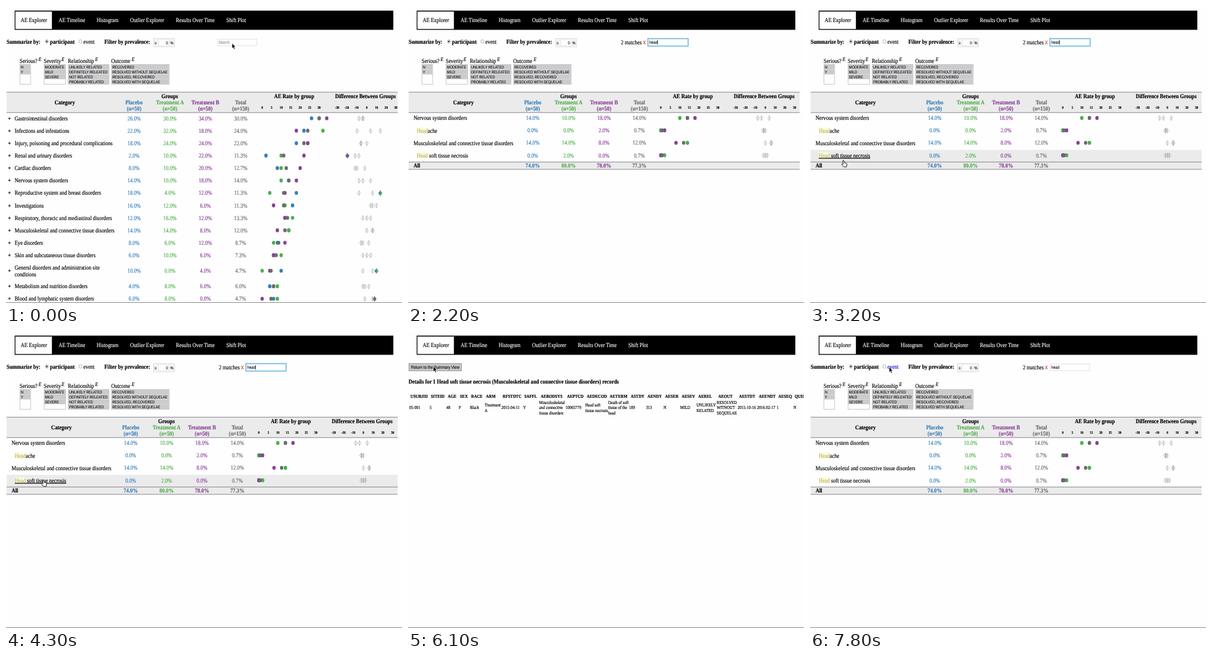
These frames come from a looping animation (640 px wide and 480 px high, 8 s). An HTML page:

```html
<!DOCTYPE html>
<html lang="en">
<head>
<meta charset="utf-8">
<title>AE Explorer</title>
<style>
  html, body { margin: 0; width: 100%; height: 100%; overflow: hidden; background: #fefefe; }
  svg { display: block; width: 640px; height: 480px; }
  text { font: 9.77px "Liberation Serif", Times, serif; text-rendering: geometricPrecision; white-space: pre; }
  text, tspan { fill: currentColor; stroke: currentColor; stroke-width: 0.18px; }
  .b { font-weight: bold; }
  .i { font-style: italic; font-size: 8.5px; }
  .m { text-anchor: middle; }
  .ui { font: 6.75px "Liberation Sans", Arial, sans-serif; stroke-width: 0.08px; }
  .opt { font-size: 6.5px; }
  .btn { font-size: 7.15px; }
  .x { font-size: 8.6px; }
  .tick { font-size: 6px; font-weight: bold; }
  .th { font-size: 7.6px; font-weight: bold; }
  .td { font-size: 7.4px; }
  .bg { fill: none; }
  .hover .bg { fill: #ebebeb; }
  .hover .cat { text-decoration: underline; }
</style>
</head>
<body>
<svg id="stage" viewBox="0 0 640 480"></svg>
<script>
const LOOP = 8000, STEP = 100;
const SQUEEZE = 0.857;
const BLUE = '#377eb8', GREEN = '#4daf4a', PURPLE = '#8a3f98', GRAY = '#6b6b6b';
const COLORS = [BLUE, GREEN, PURPLE, GRAY];
const PAGE = '#fefefe', BAND = '#ebebeb', PICKED = '#cbcbcd', LINE = '#6c6c78';

const text = (x, y, s, cls = '', color = '#000') =>
  `<text class="${cls}" color="${color}" transform="translate(${x} ${y}) scale(${SQUEEZE} 1)">${s}</text>`;
const rect = (x, y, w, h, fill, stroke = 'none', sw = 0.7) =>
  `<rect x="${x}" y="${y}" width="${w}" height="${h}" fill="${fill}" stroke="${stroke}" stroke-width="${sw}"/>`;
const rule = y => rect(1, y, 632, 0.8, LINE);
const group = (id, body, cls = '') => `<g id="${id}" class="${cls}">${body}</g>`;

function nav() {
  const tabs = [['AE Timeline', 85], ['Histogram', 146.5], ['Outlier Explorer', 200.5],
    ['Results Over Time', 274.5], ['Shift Plot', 356]];
  return rect(14, 7.5, 612, 31, '#000') + rect(15.2, 9, 59, 28.2, PAGE) +
    text(23.7, 26, 'AE Explorer') + tabs.map(([s, x]) => text(x, 26, s, '', '#fff')).join('');
}

const radio = (x, on) =>
  `<ellipse cx="${x}" cy="57.3" rx="2.6" ry="3" fill="#f6f6f6" stroke="#a0a0a0" stroke-width=".7"/>` +
  (on ? `<ellipse cx="${x}" cy="57.3" rx="1.3" ry="1.5" fill="#333"/>` : '');

function select(x, w, label, markX, options) {
  return text(x, 92, label) + text(markX, 88.8, 'E', 'i') +
    rect(x + 0.4, 94.4, w, 32.2, PAGE, '#b4b4b4') +
    options.map((s, i) => rect(x + 0.8, 95 + i * 7.8, w - 0.8, 7.8, PICKED) +
      text(x + 2, 101.3 + i * 7.8, s, 'ui opt')).join('');
}

function controls() {
  return text(1, 60.7, 'Summarize by:', 'b') + radio(66, true) + text(71, 60.7, 'participant', 'b') +
    radio(120.3, false) + group('event', text(125, 60.7, 'event')) +
    text(159, 60.7, 'Filter by prevalence:', 'b') +
    rect(238.5, 52.5, 34, 13.5, '#f4f4f4', '#d4d4d0') + rect(246.5, 54, 17, 10.5, PAGE, '#d8d8d4', 0.5) +
    text(240.3, 61.5, '≥', 'ui') + text(258.5, 61.7, '0', 'ui') + text(265.5, 61.5, '%', 'ui') +
    select(22, 17.5, 'Serious?', 52.5, ['N', 'Y']) +
    select(61, 35, 'Severity', 89.7, ['MODERATE', 'MILD', 'SEVERE']) +
    select(100, 66, 'Relationship', 144, ['UNLIKELY RELATED', 'DEFINITELY RELEATED', 'NOT RELATED', 'PROBABLY RELATED']) +
    select(170, 93.5, 'Outcome', 203, ['RECOVERED', 'RESOLVED WITHOUT SEQUELAE', 'RESOLVED, RECOVERED', 'RESOLVED WITH SEQUELAE']);
}

// Column centres; dx shifts the whole table when the toggle column is gone.
const COLS = [207, 265, 322.2, 379.3];
const rateX = v => 414 + v * 3.07;
const diffX = v => 583 + v * 1.57;

function head(dx) {
  const names = ['Placebo', 'Treatment A', 'Treatment B', 'Total'];
  let s = rect(1, 139, 632, 33, BAND) + rule(138.8) + rule(171.8) +
    text(95 + dx, 158.7, 'Category', 'b m') + text(264.7 + dx, 148.6, 'Groups', 'b m') +
    text(465.7 + dx, 148.6, 'AE Rate by group', 'b m') +
    text(581 + dx, 148.6, 'Difference Between Groups', 'b m');
  names.forEach((n, i) => {
    s += text(COLS[i] + dx, 158.7, n, 'b m', COLORS[i]) +
      text(COLS[i] + dx, 169, i < 3 ? '(n=50)' : '(n=150)', 'b m', COLORS[i]);
  });
  for (let v = 0; v <= 30; v += 5) s += text(rateX(v) + dx, 166, v, 'tick m');
  for (let v = -30; v <= 30; v += 10) s += text(diffX(v) + dx - (v < 0 ? 0.8 : 0), 166, v, 'tick m');
  return s;
}

function diamond(x, y, left, right, strong) {
  const half = (w, c) => `<path d="M${x} ${y - 4}l${w} 4l${-w} 4z" fill="${c}" fill-opacity="${strong ? 1 : 0.07}" ` +
    `stroke="${strong ? c : '#8c8c8c'}" stroke-width=".6" stroke-opacity="${strong ? 1 : 0.5}"/>`;
  return half(-3, left) + half(3, right);
}

const PAIRS = [[0, 1], [0, 2], [1, 2]];

function values(y, all, dx, cls) {
  return all.map((v, i) => text(COLS[i] + dx, y + 3, v.toFixed(1) + '%', cls, COLORS[i])).join('');
}

function row(y, rates, dx, strong = -1) {
  const all = [...rates, (rates[0] + rates[1] + rates[2]) / 3];
  const dots = all.map((v, i) =>
    `<ellipse cx="${rateX(v) + dx}" cy="${y - 0.3}" rx="2.7" ry="3.2" fill="${COLORS[i]}"/>`).join('');
  const diffs = PAIRS.map(([a, b], i) =>
    diamond(diffX(rates[a] - rates[b]) + dx, y, COLORS[a], COLORS[b], i === strong)).join('');
  return values(y, all, dx, 'm') + dots + diffs;
}

const ROWS = [
  ['Gastrointestinal disorders', 26, 30, 34],
  ['Infections and infestations', 22, 32, 18],
  ['Injury, poisoning and procedural complications', 18, 24, 24],
  ['Renal and urinary disorders', 2, 10, 22, 1],
  ['Cardiac disorders', 8, 10, 20],
  ['Nervous system disorders', 14, 10, 18],
  ['Reproductive system and breast disorders', 18, 4, 12, 0],
  ['Investigations', 16, 12, 6],
  ['Respiratory, thoracic and mediastinal disorders', 12, 16, 12],
  ['Musculoskeletal and connective tissue disorders', 14, 14, 8],
  ['Eye disorders', 8, 6, 12],
  ['Skin and subcutaneous tissue disorders', 6, 10, 6],
  ['General disorders and administration site|conditions', 10, 0, 4, 0],
  ['Metabolism and nutrition disorders', 4, 8, 6],
  ['Blood and lymphatic system disorders', 6, 8, 0, 2]
];

function fullTable() {
  let y = 181.7, s = head(0);
  for (const [name, a, b, c, strong] of ROWS) {
    const lines = name.split('|'), extra = (lines.length - 1) * 5;
    y += extra;
    s += text(3.3, y + 3, '+', 'b') + row(y, [a, b, c], 0, strong);
    lines.forEach((l, i) => { s += text(14, y + 3 - extra + i * 10.7, l); });
    y += 20.12 + extra;
  }
  return s;
}

const FOUND = [
  ['Nervous system disorders', 14, 10, 18],
  ['Head|ache', 0, 0, 2],
  ['Musculoskeletal and connective tissue disorders', 14, 14, 8],
  ['Head| soft tissue necrosis', 0, 2, 0]
];

function foundTable() {
  const dx = -5.4;
  let s = head(dx);
  FOUND.forEach(([name, ...rates], i) => {
    const y = 181.2 + i * 20.1, [hit, rest] = name.split('|');
    const label = rest
      ? rect(14, y - 5, 18, 10.3, '#fcfcdc') + text(14.3, y + 3.2, `<tspan color="#b8b070">${hit}</tspan>${rest}`, 'cat')
      : text(9, y + 3.2, name, 'cat');
    s += group('found' + i, `<rect class="bg" x="1" y="${y - 9}" width="632" height="20"/>` + label + row(y, rates, dx), 'row');
  });
  return s + rect(1, 252, 632, 12, BAND) + rule(251.7) + rule(263.6) +
    text(9, 261, 'All', 'b') + values(258, [74, 80, 78, 77.3], dx, 'm b');
}

// heading, heading x, cell, cell x
const DETAILS = [
  ['USUBJID', 4, '05-001', 2], ['SITEID', 37, '5', 35], ['AGE', 64.3, '48', 62], ['SEX', 84, 'F', 82],
  ['RACE', 102, 'Black', 100], ['ARM', 126, 'Treatment|A', 124], ['RFSTDTC', 153, '2015-04-11', 151],
  ['SAFFL', 188, 'Y', 186], ['AEBODSYS', 214.5, 'Musculoskeletal|and connective|tissue disorders', 212],
  ['AEPTCD', 257, '10065779', 254.5], ['AEDECOD', 289, 'Head soft|tissue necrosis', 286.5],
  ['AETERM', 326, 'Death of soft|tissue of the|head', 323.5], ['ASTDY', 360, '189', 357.3],
  ['AENDY', 387, '313', 384.7], ['AESER', 415.5, 'N', 413], ['AESEV', 442.3, 'MILD', 440],
  ['AEREL', 469, 'UNLIKELY|RELATED', 466.3], ['AEOUT', 501.5, 'RESOLVED|WITHOUT|SEQUELAE', 499],
  ['AESTDT', 535, '2015-10-16', 532.7], ['AEENDT', 567, '2016-02-17', 564], ['AESEQ', 598.5, '1', 596],
  ['QUESTION', 625, 'N', 623]
];

function details() {
  let s = rect(1.4, 52.4, 85.2, 12, '#c4c4c4', '#8c8c8c') + text(5, 61, 'Return to the Summary View', 'ui btn') +
    text(1, 85, 'Details for 1 Head soft tissue necrosis (Musculoskeletal and connective tissue disorders) records', 'b');
  for (const [h, hx, cell, x] of DETAILS) {
    s += text(hx, 107.8, h, 'th');
    const lines = cell.split('|');
    lines.forEach((l, i) => { s += text(x, 126.3 + (i - (lines.length - 1) / 2) * 8.5, l, 'td'); });
  }
  return s;
}

const POINTERS = {
  arrow: '<path d="M0 0V8.8L1.9 7L3.3 10.2L4.7 9.5L3.4 6.5H5.8Z" fill="#000" stroke="#fff" stroke-width=".6"/>',
  beam: '<path d="M-2 -5Q0 -5 0 -3.8Q0 -5 2 -5M0 -4V4M-2 5Q0 5 0 3.8Q0 5 2 5M-1 1.5H1" fill="none" stroke="#111" stroke-width=".9"/>',
  hand: '<path d="M-1 0Q0 -1 .8 0L1.6 3.4L5 4.4Q6 5 5.6 7L5 10H.4L-2.6 6.4Q-3.2 5 -1.8 5L-.2 6Z" fill="#fff" stroke="#111" stroke-width=".9"/>'
};

document.getElementById('stage').innerHTML =
  rect(0, 0, 640, 480, PAGE) + nav() +
  group('controls', controls()) + group('full', fullTable()) + group('found', foundTable()) +
  group('matches', text(344, 61.7, '2 matches') + text(379.6, 61.8, 'X', 'ui x', '#d42020')) +
  group('search', rect(0.5, 53.3, 63.5, 10.8, PAGE, '#d6d6cc') +
    group('ring', rect(-0.4, 52.6, 65.2, 12.2, 'none', '#74bfe8', 1.6)) +
    text(2, 61.3, '', 'ui query') + group('caret', rect(0, 55.3, 0.6, 7.4, '#000'))) +
  group('details', details()) + rect(0, 479, 640, 1, '#8c8c8c') +
  group('pointer', Object.entries(POINTERS).map(([k, d]) => group(k, d)).join(''));

const $ = id => document.getElementById(id);
const show = (id, on) => { $(id).style.display = on ? '' : 'none'; };
const query = document.querySelector('.query');

// time, x, y
const PATH = [
  [0, 365.3, 60], [200, 366, 60], [700, 379, 60], [2500, 379, 60], [2900, 130, 266], [3200, 54, 250],
  [3700, 54, 250], [4200, 60, 241], [4800, 60, 241], [5400, 46, 92], [5700, 41, 57],
  [6900, 41, 57], [7300, 74, 58], [7400, 96, 58], [7500, 96, 58], [7800, 128, 58], [8000, 128, 58]
];

function pointerAt(t) {
  const i = Math.max(1, PATH.findIndex(p => p[0] > t));
  const [t0, x0, y0] = PATH[i - 1], [t1, x1, y1] = PATH[i];
  const k = (t - t0) / (t1 - t0), e = k * k * (3 - 2 * k);
  return [x0 + (x1 - x0) * e, y0 + (y1 - y0) * e];
}

function draw(t) {
  const scene = t < 2200 ? 'full' : t >= 4600 && t < 6600 ? 'details' : 'found';
  const inDetails = scene === 'details', inFound = scene === 'found';
  const focused = t >= 1000 && t < 4600;
  const typed = 'head'.slice(0, Math.max(0, Math.floor((t - 1800) / 100)));
  for (const id of ['full', 'found', 'details']) show(id, id === scene);
  for (const id of ['controls', 'search']) show(id, !inDetails);
  show('matches', inFound);
  show('ring', focused);
  show('caret', focused);

  query.textContent = typed || 'Search';
  query.setAttribute('color', typed ? '#000' : '#8a8a8a');
  $('search').setAttribute('transform', `translate(${inFound ? 388 : 341.5} 0)`);
  $('caret').setAttribute('transform', `translate(${2 + typed.length * 3.25} 0)`);

  const [x, y] = pointerAt(t);
  const over = inFound && y >= 172 && y < 252 ? Math.min(3, Math.floor((y - 172) / 20.1)) : -1;
  FOUND.forEach((_, i) => $('found' + i).classList.toggle('hover', i === over));
  $('event').firstChild.setAttribute('color', inFound && t > 7000 && x > 117 ? '#1010e0' : '#000');

  const kind = over >= 0 ? 'hand' : t >= 300 && t < 1900 ? 'beam' : 'arrow';
  for (const k in POINTERS) show(k, k === kind);
  show('pointer', t < 1900 || t >= 2600);
  $('pointer').setAttribute('transform', `translate(${x} ${y})`);
}

function tick(now) {
  draw(Math.floor(now % LOOP / STEP) * STEP);
  requestAnimationFrame(tick);
}
draw(0);
requestAnimationFrame(tick);
</script>
</body>
</html>
```
